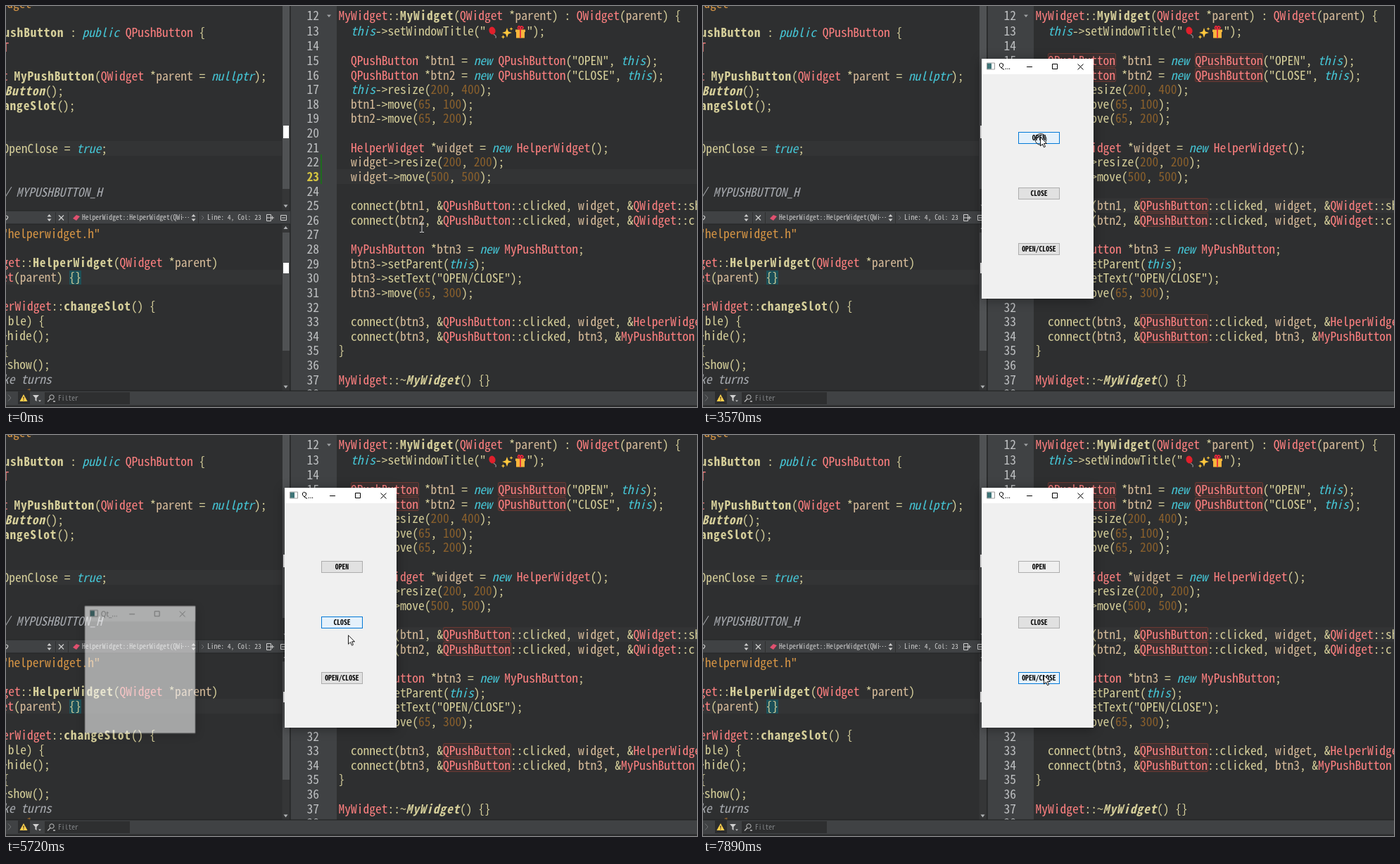
An HTML page that plays this animation: 982x570 px, repeating every 8000 ms.

```html
<!DOCTYPE html>
<html lang="en">
<head>
<meta charset="utf-8">
<title>Signals and slots</title>
<style>
:root { --mono: "Noto Sans Mono CJK SC", "Noto Sans Mono CJK JP", "Noto Sans Mono", monospace; }
html, body { margin: 0; width: 100%; height: 100%; overflow: hidden; background: #2e2f30; }
#stage { position: relative; width: 982px; height: 570px; overflow: hidden; background: #2e2f30; }
#stage div, #stage svg { position: absolute; }
.code div, .num { white-space: pre; line-height: 20.6px; height: 20.6px; color: #d6cf9a; font-family: var(--mono); }
.code b { letter-spacing: .82px; }
.code s { text-decoration: none; }
.t { color: #ff8080; } .k { color: #45c6d6; font-style: italic; } .n { color: #8a602c; }
.v { color: #d6bb9a; } .q { color: #d69545; } .c { color: #a8abb0; font-style: italic; }
.num { color: #bec0c2; }
.now { color: #d6c540; font-weight: bold; background: #404244; }
.ui { font: 9.6px/20px var(--mono); color: #d0d0d0; white-space: pre; }
.line { background: #333435; height: 21px; }
.occ { width: 95px; height: 18px; border: 1px solid #6b3832; background: #3e3131; border-radius: 2px; }
.win { width: 159px; background: #f0f0f0; box-shadow: 0 2px 14px rgba(0,0,0,.38); }
.bar { left: 0; top: 0; width: 159px; height: 22px; background: #fff; }
.bar svg { left: 0; top: 0; }
.btn { left: 52px; width: 57px; height: 15px; border: 1px solid #adadad; background: #e1e1e1; color: #000;
  font: bold 9.7px/14px var(--mono); text-align: center; }

#stage .a { animation-duration: 8s; animation-iteration-count: infinite; animation-timing-function: linear; }
#stage .s { animation-timing-function: step-end; }
#row { animation-name: row; }
@keyframes row { 0% { transform: none } 6.1%, 100% { transform: translateY(41.2px) } }
#n23 { animation-name: n23; }
@keyframes n23 { 0% { opacity: 1 } 6.1%, 100% { opacity: 0 } }
#n25 { animation-name: n25; }
@keyframes n25 { 0% { opacity: 0 } 6.1%, 100% { opacity: 1 } }
#occs { animation-name: occs; }
@keyframes occs { 0% { opacity: 0 } 11.75%, 100% { opacity: 1 } }
#caret { animation-name: caret; }
@keyframes caret { 0%, 12.75%, 26%, 100% { opacity: 0 } 6.1%, 19.375% { opacity: 1 } }
#beam { animation-name: beam; }
@keyframes beam {
  0%, 1.5% { transform: translate(591px,315px); opacity: 1 }
  5.5% { transform: translate(638px,290px) }
  6.75%, 19% { transform: translate(641px,290px) }
  22%, 30.5% { transform: translate(641px,291px) }
  33.75% { transform: translate(634px,294px) }
  36.5% { transform: translate(556px,252px); opacity: 1 }
  36.51%, 100% { transform: translate(556px,252px); opacity: 0 }
}
#arrow { animation-name: arrow; }
@keyframes arrow {
  0%, 36.5% { transform: translate(556px,252px); opacity: 0 }
  36.51% { transform: translate(556px,252px); opacity: 1 }
  43%, 49% { transform: translate(479px,186px) }
  52.75% { transform: translate(477px,235px) }
  56%, 58% { transform: translate(480px,262px) }
  64%, 69.5% { transform: translate(483px,266px) }
  71.5% { transform: translate(486px,284px) }
  75%, 100% { transform: translate(484px,341px); opacity: 1 }
}
#ring { animation-name: ring; }
@keyframes ring {
  0%, 46%, 69.6%, 77%, 85.2%, 89.8%, 95%, 100% { opacity: 0 }
  44.6%, 68%, 75.3%, 83.8%, 88.4%, 93.4% { opacity: 1 }
}
#main { animation-name: main; }
@keyframes main {
  0%, 30.6% { opacity: 0; transform: scale(.93) }
  33%, 100% { opacity: 1; transform: none }
}
#help { animation-name: help; }
@keyframes help {
  0%, 45.6%, 73.2%, 77%, 87%, 89.6%, 96.7%, 100% { opacity: 0; transform: scale(.95) }
  47.8%, 70.5%, 78.8%, 85.3%, 91.5%, 94.8% { opacity: 1; transform: none }
  71.5% { opacity: .62; transform: scale(.987) }
}
#main .bar { animation-name: front; }
@keyframes front {
  0%, 68%, 83.8%, 93.4%, 100% { color: #000 }
  45.6%, 77%, 89.6% { color: #999 }
}
#help .bar { animation-name: back; }
@keyframes back {
  0%, 68%, 83.8%, 93.4%, 100% { color: #999 }
  45.6%, 77%, 89.6% { color: #000 }
}
#pink { animation-name: pink; }
@keyframes pink { 0%, 47% { opacity: 1 } 52.75% { opacity: .75 } 56%, 100% { opacity: 0 } }
#b1 { animation-name: b1; }
@keyframes b1 {
  0%, 41.5%, 52%, 80% { background: #e1e1e1; border-color: #adadad }
  43%, 49% { background: #e5f1fb; border-color: #0078d7 }
  85%, 100% { background: #efefef; border-color: #adadad }
}
#b2 { animation-name: b2; }
@keyframes b2 {
  0%, 54.5%, 74%, 100% { background: #e1e1e1; border-color: #adadad }
  56%, 71.5% { background: #e5f1fb; border-color: #0078d7 }
}
#b3 { animation-name: b3; }
@keyframes b3 {
  0%, 73.5% { background: #e1e1e1; border-color: #adadad }
  75%, 100% { background: #e5f1fb; border-color: #0078d7 }
}
</style>
</head>
<body>
<div id="stage">
  <div class="line" style="left:0;top:192px;width:392px"></div>
  <div class="line" style="left:0;top:375px;width:392px"></div>
  <div style="left:90px;top:376px;width:17px;height:20px;background:#1c5058"></div>
  <div class="line a s" id="row" style="left:470px;top:232px;width:512px"></div>
  <div style="left:404px;top:0;width:66px;height:547px;background:#404244"></div>
  <div style="left:447px;top:211px;width:2px;height:42px;background:#1f6b1f"></div>
  <div class="a s" id="occs"></div>
  <div id="gutter"></div>
  <div class="code" id="left" style="left:0;top:0;width:392px;height:547px;overflow:hidden"></div>
  <div class="code" id="right"></div>
  <div class="a s" id="caret" style="left:639px;top:274px;width:2px;height:19px;background:#d6cf9a"></div>

  <svg width="982" height="570">
    <path d="M456 12.5h6l-3 3.500z" fill="#a0a2a4"/>
    <!-- emoji in the title string -->
    <ellipse cx="691" cy="35" rx="4.500" ry="5.500" fill="#e0202c" transform="rotate(-15 691 35)"/>
    <path d="M693 40.500q4 1 3 5" fill="none" stroke="#b8b8b8"/>
    <g fill="#ffc83d">
      <path d="M712 31l1.800 5.200 5.200 1.800-5.200 1.800-1.800 5.200-1.800-5.200-5.200-1.800 5.200-1.800z"/>
      <path d="M706.500 41l.8 2.200 2.200.8-2.200.8-.8 2.200-.8-2.200-2.200-.8 2.200-.8zM718 30l.7 1.800 1.800.7-1.800.7-.7 1.800-.7-1.800-1.800-.7 1.800-.7z"/>
      <path d="M725 36h12v9.500h-12zM724 33.500h14v3.500h-14z" fill="#f7b63c"/>
    </g>
    <path d="M731 33.500v12M731 33.500q-5-1-3-4t3 4q0-6 3-4t-3 4" fill="none" stroke="#e8283a" stroke-width="1.800"/>
    <!-- scroll columns -->
    <path d="M392.500 0h11v547h-11z" fill="#353637"/>
    <path d="M393 0h10v260h-10zM393 322h10v168h-10z" fill="#505254"/>
    <path d="M394 170h8v18h-8zM394 365h8v15h-8z" fill="#fff"/>
    <path d="M404 0v547" stroke="#1f2021"/>
    <path d="M394.500 282.500h6l-3 4zM394.500 317h6l-3-4zM394.500 539.500h6l-3 4z" fill="#b0b2b4"/>
    <!-- editor toolbar -->
    <path d="M0 291h404v19H0z" fill="#404244"/>
    <path d="M0 291h404M0 310h404" stroke="#232425"/>
    <path d="M70.500 293v16M88.500 293v16M273.500 293v16" stroke="#303132"/>
    <path d="M58.500 299.500h6l-3-3.500zM58.500 302.500h6l-3 3.500zM263.500 299.500h6l-3-3.500zM263.500 302.500h6l-3 3.500z" fill="#d0d0d0"/>
    <path d="M75 297.500l7 7m0-7l-7 7M0 298q4 1 2 4l-2 2" stroke="#d0d0d0" fill="none" stroke-width="1.200"/>
    <path d="M95 302l5-5 5 2-5 6z" fill="#e0506f"/>
    <path d="M251 300.500h9" stroke="#d0d0d0" stroke-width="1.200" stroke-dasharray="1.200 2.600"/>
    <path d="M278 298l3 3-3 3" fill="none" stroke="#707274"/>
    <path d="M370.500 296.500h6v9h-6zM370 301h11M378.500 298.500v5M390.500 297.500h8v7h-8zM392 301h5" fill="none" stroke="#d0d0d0"/>
    <!-- output bar -->
    <path d="M0 547h982v23H0z" fill="#404244"/>
    <path d="M0 547h982" stroke="#1d1e1f"/>
    <path d="M0 567.500h982v2.500H0z" fill="#2b2c2d"/>
    <path d="M55 549h121v17H55z" fill="#2e2f30"/>
    <path d="M17 548h17v18H17z" fill="#2c2d2e"/>
    <path d="M3 552.500l4 4.500-4 4.500" fill="none" stroke="#707274"/>
    <path d="M25 552l5.500 10h-11z" fill="#ffd24d"/>
    <path d="M25 555.500v3m0 1v1.200" stroke="#3a3020" stroke-width="1.300"/>
    <path d="M38 553h9l-3.500 4v5l-2-1.500v-3.500zM46 560.500h4l-2 2z" fill="#d0d0d0"/>
    <circle cx="65" cy="556" r="3.200" fill="none" stroke="#c0c0c0"/>
    <path d="M63 558.500l-4 4M67 562h3" stroke="#c0c0c0" stroke-width="1.300"/>
  </svg>
  <div class="ui" style="left:108px;top:290px">HelperWidget::HelperWidget(QWi</div>
  <div class="ui" style="left:286px;top:290px">Line: 4, Col: 23</div>
  <div class="ui" style="left:74px;top:547px;color:#85878a">Filter</div>

  <div class="win a" id="main" style="left:396px;top:75px;height:341px">
    <div class="bar a s"></div>
    <div class="btn a" id="b1" style="top:104px">OPEN</div>
    <div class="btn a" id="b2" style="top:183px">CLOSE</div>
    <div class="btn a" id="b3" style="top:262px">OPEN/CLOSE</div>
  </div>
  <div class="win a" id="help" style="left:111px;top:242px;height:183px">
    <div class="bar a s"><div class="a" id="pink" style="left:121px;top:0;width:38px;height:22px;background:#ffdfe5"></div></div>
  </div>

  <svg class="a" id="beam" width="1" height="1" style="overflow:visible;left:0;top:0">
    <path d="M-3 -6.500h2.500l.5.500.5-.5h2.500M0 -6v12M-3 6.500h2.500l.5-.5.5.5h2.500" fill="none" stroke="#d8d8d8"/>
  </svg>
  <svg class="a" id="arrow" width="1" height="1" style="overflow:visible;left:0;top:0">
    <circle class="a s" id="ring" cx="1" cy="3.500" r="8" fill="none" stroke="#222"/>
    <path d="M.5.500v12.500l3-2.800 2 4.600 2-.9-2-4.400h4z" fill="#fff" stroke="#000" stroke-width=".9"/>
  </svg>
</div>
<script>
const $ = id => document.getElementById(id);
const ADV = 8.73, X0 = 472.6;

// choose the size that gives the editor's character advance
const pen = document.createElement('canvas').getContext('2d');
pen.font = '100px ' + getComputedStyle(document.documentElement).getPropertyValue('--mono');
const size = 100 * ADV / pen.measureText('0').width;

const rules = /(<b.*?<\/b>|<s.*?<\/s>)|\b(this|new|public|nullptr|true)\b|\b(My\w+|Q[A-Z]\w+|HelperWidget)\b|\b(\d+)\b|\b(btn\d|widget|parent)\b/g;
const paint = text => text.replace(rules, (m, raw, k, t, n) =>
  raw || `<s class="${k ? 'k' : t ? 't' : n ? 'n' : 'v'}">${m}</s>`);

function add(parent, cls, x, y, html) {
  const el = document.createElement('div');
  el.className = cls;
  el.style.left = x + 'px';
  el.style.top = y + 'px';
  if (html) { el.innerHTML = html; el.style.fontSize = size + 'px'; }
  parent.append(el);
  return el;
}

const rowTop = n => n > 14 ? 67 + 20.62 * (n - 15) : [3, 25, 46][n - 12];
const click = (who, rest) => `  connect(${who}, &QPushButton::clicked, ${rest});`;
const lines = [
  'MyWidget::<b>MyWidget</b>(QWidget *parent) : QWidget(parent) {',
  '  this->setWindowTitle("',
  '',
  '  QPushButton *btn1 = new QPushButton("OPEN", this);',
  '  QPushButton *btn2 = new QPushButton("CLOSE", this);',
  '  this->resize(200, 400);',
  '  btn1->move(65, 100);',
  '  btn2->move(65, 200);',
  '',
  '  HelperWidget *widget = new HelperWidget();',
  '  widget->resize(200, 200);',
  '  widget->move(500, 500);',
  '',
  click('btn1', 'widget, &QWidget::show'),
  click('btn2', 'widget, &QWidget::close'),
  '',
  '  MyPushButton *btn3 = new MyPushButton;',
  '  btn3->setParent(this);',
  '  btn3->setText("OPEN/CLOSE");',
  '  btn3->move(65, 300);',
  '',
  click('btn3', 'widget, &HelperWidget::changeSlot'),
  click('btn3', 'btn3, &MyPushButton::changeSlot'),
  '}',
  '',
  'MyWidget::~<b style="font-style:italic">MyWidget</b>() {}',
  ''
];
lines.forEach((text, i) => {
  const n = i + 12, y = rowTop(n);
  add($('gutter'), 'num', 427.5, y, String(n));
  if (text) add($('right'), '', X0, y, paint(text));
});
add($('right'), '', 740, rowTop(13), '");');
for (const n of [23, 25])
  add($('gutter'), 'num now a s', 427.5, rowTop(n), String(n)).id = 'n' + n;
for (const [col, ...rows] of [[2, 15, 16], [26, 15, 16], [17, 25, 26, 33, 34]])
  for (const n of rows) add($('occs'), 'occ', X0 + col * ADV - .5, Math.round(rowTop(n)));

// x, centre line, text
const side = [
  [-25, -4, '<s class="q">QWidget></s>'],
  [-3.5, 37, '<b>ushButton</b> : public QPushButton {'],
  [-4.5, 58, '<s class="t">T</s>'],
  [-6, 99, '<s class="t">t</s> <b>MyPushButton</b>(QWidget *parent = nullptr);'],
  [-11, 120, '<b style="font-style:italic">hButton</b>();'],
  [-4, 140.5, '<b>angeSlot</b>();'],
  [-4.5, 202, 'OpenClose = true;'],
  [-3, 264, '<s class="c">/ MYPUSHBUTTON_H</s>'],
  [-6, 323, '<s class="q">"helperwidget.h"</s>'],
  [-5.5, 364, '<s class="t">get</s>::<b>HelperWidget</b>(QWidget *parent)'],
  [-6.5, 385, '<s class="t">et</s>(parent) {}'],
  [-5, 426, '<s class="t">erWidget</s>::<b>changeSlot</b>() {'],
  [-6, 447, 'ible) {'],
  [-7, 468, '>hide();'],
  [-4.5, 488.5, '{'],
  [-7, 509, '>show();'],
  [-5, 530, '<s class="c">ke turns</s>'],
  [29, 550, '1']
];
for (const [x, y, text] of side) add($('left'), '', x, y - 10, paint(text));

const chrome = title => `<svg width="159" height="22">
  <path d="M7.500 6h11v9h-11z" fill="#fff" stroke="#9a9a9a"/><path d="M8 6.500h6v8H8z" fill="#3f7477"/>
  <g fill="none" stroke="currentColor"><path d="M64 11.500h8M100.500 7.500h7v7h-7zM136.500 7.500l8 8m0-8l-8 8"/></g>
  ${title}</svg>`;
const label = (x, s) => `<text x="${x}" y="15" fill="currentColor" font-family="Noto Sans, sans-serif" font-size="10">${s}</text>`;
const balloon = '<path d="M28 13q-4-3-2.500-5.500t5 0q1 3-2.500 5.500l4 2.500" fill="none" stroke="currentColor"/>';
document.querySelector('#main .bar').insertAdjacentHTML('beforeend', chrome(balloon + label(33, '...')));
document.querySelector('#help .bar').insertAdjacentHTML('beforeend', chrome(label(23, 'Qt_...')));
</script>
</body>
</html>
```
